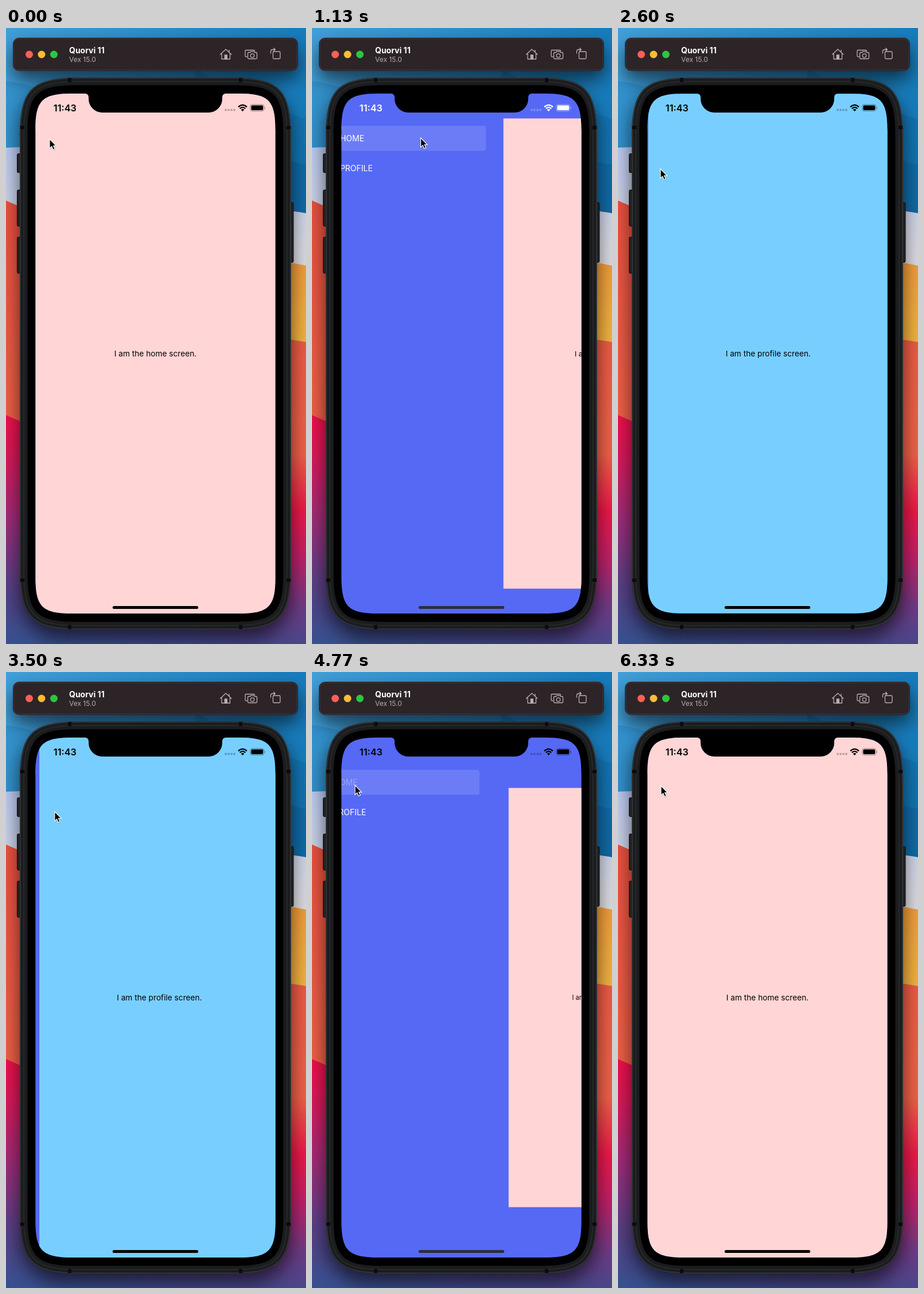
Write an HTML page that moves like this. It is 523 px wide and 1071 px high and loops after 6370 ms.

```html
<!DOCTYPE html>
<html lang="en">
<head>
<meta charset="utf-8">
<title>Drawer navigation</title>
<style>
  html, body { margin: 0; width: 100%; height: 100%; overflow: hidden; }
  svg { display: block; width: 523px; height: 1071px; font-family: Inter, Roboto, sans-serif; }
</style>
</head>
<body>
<svg viewBox="0 0 523 1071" xmlns="http://www.w3.org/2000/svg">
  <defs>
    <linearGradient id="sky" x1="0" y1="0" x2="1" y2=".28">
      <stop offset="0" stop-color="#429fd9"/><stop offset="1" stop-color="#1479b9"/>
    </linearGradient>
    <linearGradient id="mist" x1="0" y1="0" x2="0" y2="1">
      <stop offset="0" stop-color="#b9c9ee"/><stop offset="1" stop-color="#dcd9dc"/>
    </linearGradient>
    <linearGradient id="coral" x1="0" y1="300" x2="0" y2="700" gradientUnits="userSpaceOnUse">
      <stop offset="0" stop-color="#e8503f"/><stop offset="1" stop-color="#ee6148"/>
    </linearGradient>
    <linearGradient id="amber" x1="0" y1="0" x2="0" y2="1">
      <stop offset="0" stop-color="#f09a3a"/><stop offset="1" stop-color="#f0b540"/>
    </linearGradient>
    <linearGradient id="duskLeft" x1="0" y1="673" x2="0" y2="1071" gradientUnits="userSpaceOnUse">
      <stop offset="0" stop-color="#f0104a"/><stop offset=".2" stop-color="#d61a5d"/>
      <stop offset=".45" stop-color="#a02c78"/><stop offset=".72" stop-color="#5d3f85"/>
      <stop offset="1" stop-color="#36508f"/>
    </linearGradient>
    <linearGradient id="duskRight" x1="0" y1="740" x2="0" y2="1071" gradientUnits="userSpaceOnUse">
      <stop offset="0" stop-color="#ee6148"/><stop offset=".3" stop-color="#ec1848"/>
      <stop offset=".55" stop-color="#c02068"/><stop offset=".8" stop-color="#703a85"/>
      <stop offset="1" stop-color="#474689"/>
    </linearGradient>
    <linearGradient id="fadeIn" x1="60" x2="460" y1="0" y2="0" gradientUnits="userSpaceOnUse">
      <stop offset="0" stop-color="#000"/><stop offset="1" stop-color="#fff"/>
    </linearGradient>
    <mask id="rightSide"><rect width="523" height="1071" fill="url(#fadeIn)"/></mask>
    <filter id="blur" x="-20%" y="-20%" width="140%" height="140%"><feGaussianBlur stdDeviation="16"/></filter>
    <filter id="soft" x="-50%" y="-50%" width="200%" height="200%"><feGaussianBlur stdDeviation="1"/></filter>
    <clipPath id="screen"><path id="screenEdge"/></clipPath>
  </defs>

  <!-- wallpaper -->
  <rect width="523" height="1071" fill="url(#sky)"/>
  <path d="M0 92Q90 104 250 190T523 330V420H0Z" fill="#1673b0" opacity=".3"/>
  <path d="M330 70Q430 130 523 158V330H330Z" fill="#0c659f" opacity=".35"/>
  <path d="M440 210Q490 232 523 238V330H440Z" fill="#0d5b93" opacity=".4"/>
  <path d="M0 208L30 207V330H0ZM480 315L523 322V420H480Z" fill="url(#mist)"/>
  <path d="M480 405L523 413V560H480Z" fill="url(#amber)"/>
  <path d="M0 300L30 313V700H0ZM480 539L523 546V800H480Z" fill="url(#coral)"/>
  <path d="M0 673L30 686L262 800H523V1071H0Z" fill="url(#duskLeft)"/>
  <rect y="740" width="523" height="331" fill="url(#duskRight)" mask="url(#rightSide)"/>

  <!-- window shadow -->
  <g opacity=".6" filter="url(#blur)">
    <rect x="12" y="33" width="497" height="57" rx="10"/>
    <rect x="24" y="102" width="473" height="960" rx="72"/>
  </g>

  <!-- device -->
  <g fill="#202123" stroke="#0c0c0d">
    <rect x="19.5" y="218.500" width="8" height="33" rx="2"/>
    <rect x="19.5" y="281.500" width="8" height="63" rx="2"/>
    <rect x="19.5" y="363.500" width="8" height="63" rx="2"/>
    <rect x="493" y="303.500" width="8" height="104" rx="2"/>
  </g>
  <path id="frame" fill="#1b1c1d"/>
  <path id="frameEdge" fill="none" stroke="#37383a" stroke-width="1.500"/>
  <path id="frameGroove" fill="none" stroke="#27282a" stroke-width="2"/>
  <g fill="#0b0b0c">
    <rect x="108" y="87" width="6" height="7"/><rect x="406" y="87" width="6" height="7"/>
    <rect x="108" y="1038" width="6" height="7"/><rect x="406" y="1038" width="6" height="7"/>
    <rect x="25" y="170" width="7" height="6"/><rect x="489" y="170" width="7" height="6"/>
    <rect x="25" y="957" width="7" height="6"/><rect x="489" y="957" width="7" height="6"/>
  </g>
  <path id="bezel"/>

  <g clip-path="url(#screen)">
    <rect x="51" y="113" width="420" height="906" fill="#5669f5"/>
    <g id="menu" font-size="14" fill="#fff">
      <rect id="highlight" x="61.500" y="170" width="262.500" height="43.500" rx="4" opacity=".13"/>
      <text id="homeItem" x="69.500" y="197">HOME</text>
      <text id="profileItem" x="69.500" y="248.500">PROFILE</text>
    </g>
    <g id="scene">
      <rect id="page" x="-209.200" y="-452" width="418.400" height="904"/>
      <text id="caption" y="5" font-size="13.700" text-anchor="middle"></text>
    </g>
    <path d="M138 113H383V114A6 6 0 0 0 377 120V123A24 24 0 0 1 353 147H168A24 24 0 0 1 144 123V120A6 6 0 0 0 138 114Z"/>
    <g id="status">
      <text x="82.800" y="145" font-size="16.300" font-weight="600">11:43</text>
      <g opacity=".25">
        <circle cx="383" cy="142.500" r="2"/><circle cx="388" cy="142.500" r="2"/>
        <circle cx="393" cy="142.500" r="2"/><circle cx="398" cy="142.500" r="2"/>
      </g>
      <g fill="none" stroke="currentColor" stroke-width="2.300">
        <path d="M405.100 137.300Q412.500 130.500 419.900 137.300M407.700 140.100Q412.500 135.700 417.300 140.100"/>
      </g>
      <path d="M409.700 142Q412.500 139.700 415.300 142L412.500 145Z"/>
      <rect x="425.800" y="133" width="24" height="11.600" rx="3.500" fill="none" stroke="currentColor" opacity=".4"/>
      <rect x="427.400" y="134.600" width="20.800" height="8.400" rx="2"/>
      <path d="M451 137V141Q453 139 451 137Z" opacity=".45"/>
    </g>
    <rect id="indicator" x="185.800" y="1005" width="149.400" height="5" rx="2.500"/>
  </g>

  <!-- window bar -->
  <rect x="12.500" y="17.500" width="496" height="56.500" rx="10" fill="#2d2428" stroke="#1b1a1f"/>
  <rect x="13.500" y="18.500" width="494" height="54.500" rx="9" fill="none" stroke="#51474b" stroke-width=".7"/>
  <circle cx="40.500" cy="46" r="6.500" fill="#ff5f57"/>
  <circle cx="62" cy="46" r="6.500" fill="#febc2e"/>
  <circle cx="83.500" cy="46" r="6.500" fill="#28c840"/>
  <text x="110" y="44" font-size="14" font-weight="700" fill="#fff">Quorvi 11</text>
  <text x="110" y="59" font-size="12" fill="#b5adb1">Vex 15.0</text>
  <g fill="none" stroke="#b8b0b4" stroke-width="1.300" stroke-linecap="round" stroke-linejoin="round">
    <path d="M373.500 46L383.200 37L393 46M376 44.500V54H390.500V44.500M389 42V38.500"/>
    <rect x="381.300" y="47" width="4" height="7" fill="#b8b0b4"/>
    <path d="M420 50H418.500Q417 50 417 48.500V40Q417 38.500 418.500 38.500H432Q433.500 38.500 433.500 40"/>
    <path d="M423 42.500H425.500L427 40.800H432L433.500 42.500H436Q437.500 42.500 437.500 44V52Q437.500 53.500 436 53.500H423Q421.500 53.500 421.500 52V44Q421.500 42.500 423 42.500Z"/>
    <circle cx="429.500" cy="48" r="3.200"/>
    <rect x="465.500" y="41" width="12.500" height="12.500" rx="1.800"/>
    <path d="M461.500 44V41Q461.500 37.500 465 37.500H469M466.800 35L469.300 37.500L466.800 40"/>
  </g>

  <g id="cursor">
    <path d="M0 1V17L4 14L7 20L10 18L7.500 13H12Z" opacity=".35" filter="url(#soft)"/>
    <path d="M0 0V16.200L3.700 12.900L6.300 18.700L9.200 17.400L6.700 11.800H11.600Z" stroke="#fff" stroke-width="1.200"/>
  </g>
</svg>
<script>
const LOOP = 6370;
const DRAWER = 283;
const PROFILE_TAP = 2070, HOME_TAP = 4730;
const part = Object.fromEntries([...document.querySelectorAll('[id]')].map(el => [el.id, el]));

// rectangle whose corners ease into the straight sides
function smoothRect(x, y, w, h, r) {
  const reach = 1.53 * r, pull = 0.275 * r, rest = reach - pull;
  return `M${x + reach} ${y}h${w - 2 * reach}c${rest} 0 ${reach} ${pull} ${reach} ${reach}`
    + `v${h - 2 * reach}c0 ${rest} ${-pull} ${reach} ${-reach} ${reach}`
    + `h${2 * reach - w}c${-rest} 0 ${-reach} ${-pull} ${-reach} ${-reach}`
    + `v${2 * reach - h}c0 ${-rest} ${pull} ${-reach} ${reach} ${-reach}z`;
}

const outline = (name, ...box) => part[name].setAttribute('d', smoothRect(...box));
outline('frame', 24, 86, 473, 960, 70);
outline('frameEdge', 25, 87, 471, 958, 69);
outline('frameGroove', 31, 93, 459, 946, 63);
outline('bezel', 37.5, 99.5, 446, 933, 56);
outline('screenEdge', 51.3, 114, 418.4, 904, 42);

const clamp = v => Math.min(1, Math.max(0, v));

// critically damped spring from 0 to 1
const settle = ms => {
  const u = Math.max(0, ms) * 0.014;
  return 1 - (1 + u) * Math.exp(-u);
};

// slow exponential approach with a soft start
const chase = ms => {
  const d = Math.max(0, ms);
  return 1 - Math.exp(-0.006 * d * d / (d + 30));
};

// time, x, y of the pointer tip
const pointer = [
  [0, 76, 193], [810, 76, 193], [1050, 189.5, 191], [1380, 189.5, 191],
  [1860, 74, 245], [3460, 74, 245], [3680, 193, 222], [3900, 193, 222],
  [4400, 75, 197], [4900, 75, 197], [5200, 75, 198], [LOOP, 75, 198]
];

function pointerAt(t) {
  const i = pointer.findIndex(p => p[0] > t);
  const [t0, x0, y0] = pointer[i - 1], [t1, x1, y1] = pointer[i];
  const u = (t - t0) / (t1 - t0), e = u * u * (3 - 2 * u);
  return [x0 + (x1 - x0) * e, y0 + (y1 - y0) * e];
}

// touch feedback: quick dim, then recovery
function touchOpacity(ms) {
  if (ms < 0) return 1;
  return 1 - 0.7 * (clamp(ms / 30) - clamp((ms - 60) / 250));
}

function render(t) {
  const slide = DRAWER * (settle(t - 825) - settle(t - 2062) + settle(t - 3484) - settle(t - HOME_TAP));
  const shrink = chase(t - 998) * (1 - settle(t - 2080))
    + chase(t - 3660) * (1 - settle(t - 4752));
  const profile = t >= PROFILE_TAP && t < HOME_TAP;
  const open = (t >= 1000 && t < PROFILE_TAP) || (t >= 3660 && t < HOME_TAP);

  part.menu.setAttribute('transform', `translate(${slide - DRAWER} 0)`);
  part.highlight.setAttribute('y', profile ? 221.7 : 170);
  part.homeItem.setAttribute('opacity', touchOpacity(t - HOME_TAP));
  part.profileItem.setAttribute('opacity', touchOpacity(t - PROFILE_TAP));

  part.scene.setAttribute('transform', `translate(${260.5 + slide} 566) scale(${1 - 0.2 * shrink})`);
  part.page.setAttribute('fill', profile ? '#78cfff' : '#ffd5d5');
  part.caption.textContent = `I am the ${profile ? 'profile' : 'home'} screen.`;

  const ink = open ? '#fff' : '#000';
  part.status.setAttribute('fill', ink);
  part.status.setAttribute('color', ink);
  part.indicator.setAttribute('fill', slide > 60 ? '#2b2d3c' : '#000');
  part.cursor.setAttribute('transform', `translate(${pointerAt(t)})`);
}

const start = performance.now();
function tick() {
  render((performance.now() - start) % LOOP);
  requestAnimationFrame(tick);
}
tick();
</script>
</body>
</html>
```
